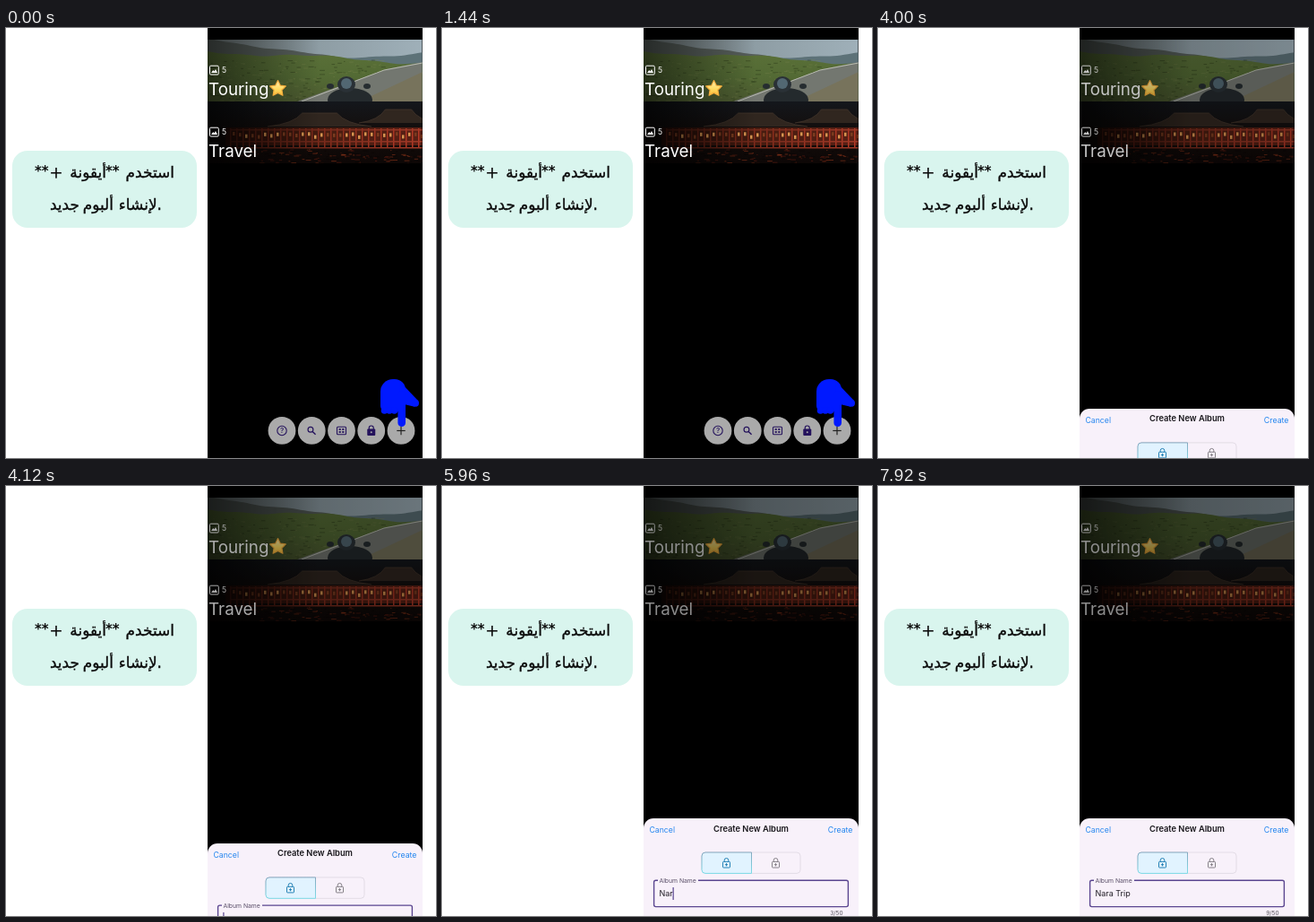
Write an HTML page with a canvas that moves like this. It is 480 by 480 pixels and loops after 8 s.

```html
<!DOCTYPE html>
<html lang="ar">
<head>
<meta charset="utf-8">
<title>Create album</title>
<style>
html, body { margin: 0; width: 100%; height: 100%; overflow: hidden; background: #fff; }
canvas { display: block; width: 480px; height: 480px; }
</style>
</head>
<body>
<canvas id="stage"></canvas>
<script>
const LOOP = 8000;
const LEFT = 225, RIGHT = 465, WIDTH = RIGHT - LEFT, PHOTO = 69;
const SANS = 'Inter, Roboto, sans-serif';
const ARABIC = '"DejaVu Sans", "Noto Sans", sans-serif';
const INK = '#24125c', PAPER = '#f8f1fa', BLUE = '#2586ef';

const canvas = document.getElementById('stage');
const dpr = Math.max(1, window.devicePixelRatio || 1);
const still = document.createElement('canvas');
canvas.width = canvas.height = still.width = still.height = 480 * dpr;
let c = still.getContext('2d');
c.scale(dpr, dpr);

const clamp = v => Math.max(0, Math.min(1, v));
const mix = (a, b, p) => a + (b - a) * p;

function random(seed) {
  return () => (seed = seed * 16807 % 2147483647) / 2147483647;
}

function rect(x, y, w, h, fill) {
  c.fillStyle = fill;
  c.fillRect(x, y, w, h);
}

function fill(color) {
  c.fillStyle = color;
  c.fill();
}

function stroke(color, width) {
  c.strokeStyle = color;
  c.lineWidth = width;
  c.stroke();
}

function path(...points) {
  c.beginPath();
  for (let i = 0; i < points.length; i += 2) c.lineTo(points[i], points[i + 1]);
}

function oval(x, y, rx, ry = rx) {
  c.beginPath();
  c.ellipse(x, y, rx, ry, 0, 0, 7);
}

function box(x, y, w, h, r) {
  c.beginPath();
  c.roundRect(x, y, w, h, r);
}

function text(str, x, y, font, color, align = 'left') {
  c.font = font;
  c.fillStyle = color;
  c.textAlign = align;
  c.fillText(str, x, y);
}

function shade(x0, y0, x1, y1, ...colors) {
  const g = c.createLinearGradient(x0, y0, x1, y1);
  colors.forEach((col, i) => g.addColorStop(i / (colors.length - 1), col));
  return g;
}

function caption() {
  box(7, 137, 206, 86, 17);
  fill('#d9f5ee');
  const word = (str, x, y) => {
    text(str, x, y, '17px ' + ARABIC, '#0c0c0c', 'right');
    c.strokeStyle = '#0c0c0c';
    c.lineWidth = .35;
    c.strokeText(str, x, y);
  };
  c.direction = 'rtl';
  word('استخدم', 188, 167);
  word('أيقونة', 112, 167);
  word('.لإنشاء', 174, 203);
  word('ألبوم', 120, 203);
  word('جديد', 82, 203);
  c.direction = 'ltr';
  for (const x of [32, 111]) text('**', x, 165, 'bold 15px ' + ARABIC, '#0c0c0c');
  text('+', 56, 169, '300 26px ' + SANS, '#0c0c0c', 'center');
}

// A wavy skyline falling from one side to the other, filled to the photo's foot.
function ridge(y0, y1, wave, color) {
  c.beginPath();
  for (let x = 0; x <= WIDTH; x += 4) {
    c.lineTo(LEFT + x, mix(y0, y1, x / WIDTH) + wave * Math.sin(x / 27) + wave / 3 * Math.sin(x / 8));
  }
  c.lineTo(RIGHT, PHOTO);
  c.lineTo(LEFT, PHOTO);
  fill(color);
}

function specks(count, seed, x0, y0, x1, y1, colors) {
  const rnd = random(seed);
  for (let i = 0; i < count; i++) {
    rect(mix(x0, x1, rnd()), mix(y0, y1, rnd()), 1 + rnd() * 5, 1, colors[i % colors.length]);
  }
}

function roadPhoto() {
  rect(LEFT, 0, WIDTH, PHOTO, shade(LEFT, 0, RIGHT, 0, '#737d7d', '#8d9ca3', '#9fb0b9'));
  ridge(-2, 36, 1.5, '#575f5b');
  ridge(34, 14, 1.5, '#5d7278');
  ridge(13, 26, 2, shade(0, 13, 0, PHOTO, '#5a7038', '#536a34', '#4c5a30'));
  specks(260, 41, LEFT, 22, 420, PHOTO, ['rgba(30,44,16,.4)', 'rgba(125,135,80,.3)']);
  path(325, 69, 425, 33, RIGHT, 25, RIGHT, 38, 405, 69);
  fill('#737770');
  path(395, 69, RIGHT, 36, RIGHT, 69);
  fill('#77735c');
  path(330, 69, 422, 34, RIGHT, 26);
  stroke('#b9bcb1', 1);
  // motorcycle
  oval(384, 67, 25, 13);
  fill('#242a2d');
  oval(380, 50, 10, 9);
  fill('#2a3136');
  oval(380, 49, 6, 6);
  fill('#526772');
  for (const x of [362, 403]) {
    oval(x, 52, 4, 3);
    fill('#262d30');
  }
}

function roof(x, y, half) {
  c.beginPath();
  c.moveTo(x - half, y + 15);
  c.quadraticCurveTo(x - half / 2, y + 12, x - half / 3, y);
  c.lineTo(x + half / 3, y);
  c.quadraticCurveTo(x + half / 2, y + 12, x + half, y + 15);
  fill('#30261f');
  stroke('#45372c', .8);
}

function templePhoto() {
  rect(LEFT, 0, WIDTH, PHOTO, shade(0, 0, 0, PHOTO, '#14171c', '#130d0b', '#0d0706'));
  roof(350, 13, 58);
  roof(438, 9, 44);
  rect(245, 29, 220, 20, shade(245, 0, RIGHT, 0, '#260d08', '#461c10', '#5a2015'));
  const rnd = random(97);
  for (let x = 250; x < RIGHT; x += 7) {
    const p = (x - LEFT) / WIDTH;
    rect(x, 30, 1.5, 22, `rgb(${mix(70, 185, p)},${mix(25, 58, p)},${mix(14, 38, p)})`);
    rect(x + 3, 34 + rnd() * 4, 2.5, 4, rnd() < .45 ? '#d89550' : '#7b3c1f');
  }
  for (const y of [31, 44, 51]) rect(250, y, 215, 1.5, shade(250, 0, RIGHT, 0, '#4c1b10', '#a03a28'));
  specks(130, 23, 262, 53, RIGHT, PHOTO, ['rgba(140,52,26,.6)', 'rgba(80,25,15,.7)', '#0b0605']);
}

function photo(top, darkness, draw) {
  c.save();
  c.translate(0, top);
  c.beginPath();
  c.rect(LEFT, 0, WIDTH - .5, PHOTO);
  c.clip();
  draw();
  rect(LEFT, 0, WIDTH, PHOTO, shade(LEFT, 0, 350, 0, `rgba(0,0,0,${darkness})`, 'rgba(0,0,0,0)'));
  c.restore();
}

function album(name, top) {
  box(227.5, top + 29.2, 9.8, 9.8, 1.2);
  stroke('#fff', 1);
  path(229, top + 37, 231.3, top + 34, 232.4, top + 35.4, 234, top + 33, 236, top + 37);
  fill('#fff');
  text('5', 241, top + 37.3, '8.5px ' + SANS, '#fff');
  text(name, 226, top + 61.7, '18.8px ' + SANS, '#fff');
}

function star(x, y) {
  c.beginPath();
  for (let i = 0; i < 10; i++) {
    const a = i * Math.PI / 5 - Math.PI / 2, r = i % 2 ? 4.6 : 9.2;
    c.lineTo(x + r * Math.cos(a), y + r * Math.sin(a));
  }
  c.closePath();
  c.lineJoin = 'round';
  fill(shade(0, y - 9, 0, y + 9, '#fff0b5', '#ffdc62', '#f8b532'));
  stroke('#f3ad3d', 1.2);
}

function shackle(x, y, r) {
  c.beginPath();
  c.moveTo(x - r, y + 2);
  c.arc(x, y, r, Math.PI, 0);
  c.lineTo(x + r, y + 2);
}

function cross(x, y, r, color, width) {
  path(x - r, y, x + r, y);
  stroke(color, width);
  path(x, y - r, x, y + r);
  stroke(color, width);
}

const ICONS = [
  (x, y) => {
    oval(x, y, 5.2);
    stroke(INK, 1.1);
    text('?', x, y + 2.9, '500 8px ' + SANS, INK, 'center');
  },
  (x, y) => {
    oval(x - 1.3, y - 1.3, 2.9);
    stroke(INK, 1.2);
    path(x + .9, y + .9, x + 4.3, y + 4.3);
    stroke(INK, 1.4);
  },
  (x, y) => {
    box(x - 5, y - 4.2, 10, 8.4, 1);
    stroke(INK, 1.1);
    for (const dx of [-2.9, .7]) for (const dy of [-2.4, .6]) rect(x + dx, y + dy, 2.2, 1.8, INK);
  },
  (x, y) => {
    box(x - 4.5, y - 2, 9, 7.6, 1);
    fill(INK);
    shackle(x, y - 3, 2.5);
    stroke(INK, 1.2);
    oval(x, y + 1.8, 1);
    fill('#aaa');
  },
  (x, y) => cross(x, y, 4.7, '#222', 1.2)
];

function buttons() {
  ICONS.forEach((icon, i) => {
    const x = 308 + i * 33.25;
    oval(x, 449.4, 15.4);
    fill('#aaa');
    icon(x, 449.5);
  });
}

function hand(scale) {
  const x = 439.5, y = 418.5, color = '#0019ff';
  c.save();
  c.translate(x, y);
  c.scale(scale, scale);
  c.translate(-x, -y);
  box(418, 392, 28, 36, [14, 12, 0, 6]);
  fill(color);
  path(439, 394, 459.5, 415.5, 456, 422.8, 440, 419);
  fill(color);
  oval(457, 418.8, 4);
  fill(color);
  for (let i = 0; i < 3; i++) {
    oval(422.5 + i * 5.5, 427, 3.8);
    fill(color);
  }
  box(437.4, 405, 8.6, 40, 4.3);
  fill(color);
  c.restore();
}

const NAME = 'Nara Trip';
const FIRST_KEY = 5400, LAST_KEY = 7350;
const KEY_GAP = (LAST_KEY - FIRST_KEY) / (NAME.length - 1);

function caretAlpha(t) {
  if (t < FIRST_KEY) return clamp(.5 + 1.5 * Math.sin((t - 4920) * Math.PI / 500));
  return t < LAST_KEY + 500 ? 1 : 0;
}

function padlock(x, y, color) {
  box(x - 4, y - 1.4, 8, 6.6, .8);
  stroke(color, 1);
  shackle(x, y - 3, 2.3);
  stroke(color, 1);
  cross(x, y + 1.9, 1.6, color, 1);
}

function sheet(top, t) {
  box(LEFT, top, WIDTH, 130, [11, 11, 0, 0]);
  fill(PAPER);
  text('Cancel', 231.5, top + 16, '8.7px ' + SANS, BLUE);
  text('Create', 458.5, top + 16, '8.8px ' + SANS, BLUE, 'right');
  text('Create New Album', 345, top + 14.5, '600 9.3px ' + SANS, '#17151a', 'center');

  const y = top + 38;
  box(290, y, 110, 23.4, 4);
  stroke('#e0dae4', .9);
  box(290, y, 55.5, 23.4, [4, 0, 0, 4]);
  fill('#e1f3ff');
  stroke(shade(0, y, 0, y + 23, '#7b9fb8', '#6fd8e4'), .9);
  padlock(317.5, y + 11.8, '#2581b5');
  padlock(372.5, y + 11.8, '#858087');

  box(236.6, top + 69.2, 216.8, 29.4, 2);
  stroke('#5b4690', 1.4);
  rect(241, top + 67.5, 45, 4, PAPER);
  text('Album Name', 242.5, top + 71.8, '6.8px ' + SANS, '#5b5069');

  const count = t < FIRST_KEY ? 0 : Math.min(NAME.length, 1 + Math.floor((t - FIRST_KEY) / KEY_GAP));
  const typed = NAME.slice(0, count);
  text(typed, 242.5, top + 87, '9px ' + SANS, '#211d25');
  const caretX = 242.3 + c.measureText(typed).width;
  c.globalAlpha = caretAlpha(t);
  rect(caretX, top + 77, 1.2, 14, '#56428d');
  c.globalAlpha = 1;
  text(count + '/50', 447.5, top + 108, '6.5px ' + SANS, '#55505b', 'right');
}

function drawStill() {
  rect(0, 0, 480, 480, '#fff');
  caption();
  rect(LEFT, 0, WIDTH, 480, '#000');
  photo(13, .55, roadPhoto);
  photo(82, .75, templePhoto);
  album('Touring', 13);
  album('Travel', 82);
  star(303.5, 67.8);
  buttons();
}

function render(t) {
  c.setTransform(1, 0, 0, 1, 0, 0);
  c.drawImage(still, 0, 0);
  c.scale(dpr, dpr);
  if (t < 1960) {
    const p = clamp((t - 480) / 960);
    hand(1 + .22 * Math.sin(Math.PI * p) ** 2);
  }
  if (t >= 3880) {
    const p = 1 - (1 - clamp((t - 3840) / 770)) ** 3;
    rect(LEFT, 0, WIDTH, 480, `rgba(0,0,0,${.45 * p})`);
    sheet(480 - 109 * p, t);
  }
}

drawStill();
c = canvas.getContext('2d');
const start = performance.now();
function tick() {
  render((performance.now() - start) % LOOP);
  requestAnimationFrame(tick);
}
tick();
</script>
</body>
</html>
```
